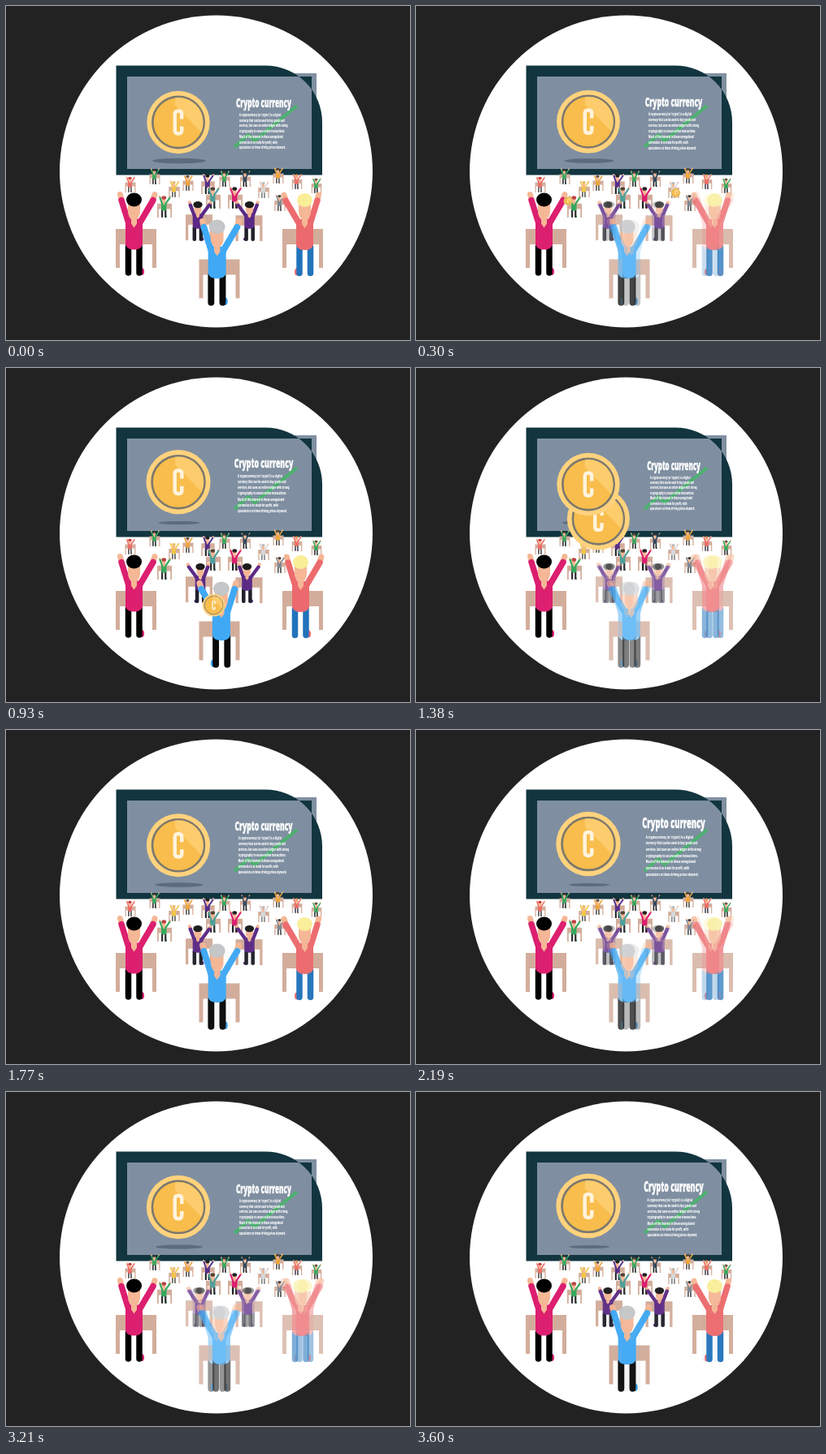
Recreate the animation shown at these times as an HTML page. Size 497 by 412 pixels, loop 3.63 s.

```html
<!DOCTYPE html>
<html lang="en">
<head>
<meta charset="utf-8">
<title>Crypto currency</title>
<style>
html, body { margin: 0; width: 100%; height: 100%; overflow: hidden; background: #222; }
svg { display: block; width: 497px; height: 412px; }
text { font-family: "Open Sans", "Noto Sans", sans-serif; font-stretch: condensed; font-weight: 800; }
</style>
</head>
<body>
<svg id="stage" viewBox="0 0 497 412">
  <defs>
    <clipPath id="face"><circle r="30.5"/></clipPath>
    <g id="coin">
      <circle r="38.5" fill="#ffd27d"/>
      <circle r="31.5" fill="#f8bd4c" stroke="#7c786e" stroke-width="2.6"/>
      <path d="M-4-32V-21L29 13L40 0V-32Z" fill="#ffd277" opacity=".75" clip-path="url(#face)"/>
      <path d="M4.200-4V-10Q4.200-14 0-14T-4.200-10V10Q-4.200 14 0 14T4.200 10V5" fill="none" stroke="#fff3dc" stroke-width="4.400"/>
    </g>
  </defs>
  <circle cx="258.5" cy="204" r="192.5" fill="#fff"/>
  <path d="M145 83H382V205H145Z" fill="#7f8fa1"/>
  <path fill-rule="evenodd" fill="#12353f" d="M135.500 73.500H319A70 70 0 0 1 389 143.500V208.500H135.500ZM149 87H376V201H149Z"/>
  <path d="M281 174L298 159L306 166L358 123" fill="none" stroke="#43b867" stroke-width="4" opacity=".85"/>
  <g id="copy" fill="#fff"></g>
  <ellipse id="shadow" cx="213" cy="191" fill="#5d6b7c"/>
  <g id="crowd"></g>
  <g id="coins"></g>
  <use id="main" href="#coin"/>
</svg>
<script>
const LOOP = 3630;
const $ = id => document.getElementById(id);
const SKIN = '#f5b795', TAN = '#d3ad9b';

const table = (x, bottom, s) =>
  `<path transform="translate(${x} ${bottom}) scale(${s})" fill="${TAN}"
    d="M-25-48H25V0H20V-29H-20V0H-25Z"/>`;

// Feet rest on y = 0; the pose leans left of its axis unless shifted.
const person = (x, foot, sx, sy, [top, hair, legs], shift = 0) =>
  `<g transform="translate(${x} ${foot}) scale(${sx} ${sy}) translate(${shift} 0)" stroke-linecap="round">
    <ellipse cx="5" cy="-5" rx="3" ry="4.500" fill="${top}"/>
    <path d="M-11.500-36V-3.500M2-36V-3.500" stroke="${legs}" stroke-width="7.500"/>
    <path d="M-20-94L-21.500-100M19-94L21-100" stroke="${SKIN}" stroke-width="7"/>
    <path d="M-15-66Q-15-70-11-70H2Q6-70 6-66V-38Q4-32-4.500-32T-15-38Z" fill="${top}"/>
    <path d="M-11-64L-20-93M2-64L19-93" stroke="${top}" stroke-width="7.500"/>
    <path d="M-12-90H3V-78Q2-72-1-70V-64L-4.500-59L-8-64V-70Q-11-72-12-78Z" fill="${SKIN}"/>
    <ellipse cx="-4.500" cy="-93.500" rx="9.500" ry="8.500" fill="${hair}"/>
  </g>`;

// x, foot, table scale, shirt, hair, trousers
const back = [
  [153, 230, .26, '#ed6b66', '#c33', '#555'], [183, 220, .26, '#35a85c', '#333', '#333'],
  [224, 228, .26, '#eda63a', '#654', '#555'], [269, 223, .26, '#35a85c', '#543', '#333'],
  [294.5, 223, .26, '#34495e', '#333', '#222'], [335, 219, .26, '#eda63a', '#543', '#555'],
  [358, 226, .25, '#ed6b66', '#e8955c', '#445'], [382, 231, .25, '#35a85c', '#654', '#333'],
  [207, 236, .27, '#f2c744', '#e8c060', '#666'], [248.5, 232, .33, '#54308c', '#222', '#222'],
  [317, 237, .27, '#d5dade', '#bbb', '#888'], [337, 253, .27, '#7d8894', '#444', '#555'],
  [195, 261, .36, '#35a85c', '#b44', '#333'], [255, 250, .36, '#4f9f9a', '#543', '#333'],
  [282, 250, .36, '#dc1f6f', '#222', '#222']
];

// axis, foot, table x, table bottom, table scale, person scale x / y, colours
const swaying = [
  [237.5, 290, 237.5, 289, .66, .6, .48, ['#5b2a86', '#1b1b1b', '#20202a']],
  [298, 290, 299, 290, .66, -.6, .48, ['#5b2a86', '#1b1b1b', '#20202a']],
  [365, 333, 365, 323, 1, -1, 1, ['#ec6a6d', '#f9ee98', '#2273bb']],
  [262.3, 369.5, 262.5, 360.5, 1, 1.05, 1.04, ['#3fa9f5', '#c4c6c8', '#0a0a0a']]
];

const pose = flip => swaying.map(([x, foot, tx, tb, ts, sx, sy, look]) =>
  `<g class="${flip < 0 ? 'right' : 'left'}">${table(tx, tb, ts)}${person(x, foot, sx * flip, sy, look, 2)}</g>`);
const lefts = pose(1), rights = pose(-1);

$('crowd').innerHTML =
  back.map(([x, y, s, ...look]) => table(x, y, s) + person(x, y, s * .85, s * .73, look, 2)).join('') +
  table(160, 323, 1) + person(162, 332.5, 1, 1, ['#dc1f6f', '#000', '#000']) +
  lefts.map((p, i) => p + rights[i]).join('');

const lines = [
  'A cryptocurrency (or ‘crypto’) is a digital',
  'currency that can be used to buy goods and',
  'services, but uses an online ledger with strong',
  'cryptography to secure online transactions.',
  'Much of the interest in these unregulated',
  'currencies is to trade for profit, with',
  'speculators at times driving prices skyward.'
];
$('copy').innerHTML =
  '<text transform="translate(317 125) scale(.53 1)" font-size="15.5" text-anchor="middle" stroke="#fff" stroke-width=".4">Crypto currency</text>' +
  lines.map((s, i) =>
    `<text transform="translate(287 ${136 + i * 6.7}) scale(.48 1)" font-size="5.2">${s}</text>`).join('');

// start, end, from x, from y, first scale, full-size time
const flights = [
  [270, 920, 187, 241, .09, 700],
  [270, 920, 320, 231, .1, 700],
  [800, 1690, 258, 301, .1, 1320]
];
$('coins').innerHTML = flights.map(() => '<use href="#coin"/>').join('');
const flying = [...$('coins').children];
const leaning = [...document.querySelectorAll('.left')];
const mirrored = [...document.querySelectorAll('.right')];

const clamp = v => Math.max(0, Math.min(1, v));
const ease = v => (1 - Math.cos(Math.PI * clamp(v))) / 2;
const mix = (a, b, v) => a + (b - a) * v;

const zoomKeys = [[0, 1], [300, 1.035], [620, 1.11], [930, 1.065], [1400, .965],
  [2190, 1.14], [2790, 1], [3000, .97], [3630, 1.08]];
const zoomAt = t => {
  const i = Math.max(1, zoomKeys.findIndex(k => k[0] > t));
  const [t0, a] = zoomKeys[i - 1], [t1, b] = zoomKeys[i];
  return mix(a, b, ease((t - t0) / (t1 - t0)));
};
const hover = t => {
  const p = t % 1395;
  return p < 840 ? ease(p / 840) : 1 - ease((p - 840) / 555);
};

function draw(t) {
  const up = hover(t), x = 212, y = mix(143.5, 140.5, up);
  $('main').setAttribute('transform', `translate(${x} ${y}) scale(${mix(1.005, 1.03, up)})`);
  $('shadow').setAttribute('rx', mix(33, 25, up));
  $('shadow').setAttribute('ry', mix(3.2, 2, up));
  $('copy').setAttribute('transform', `translate(317 152) scale(${zoomAt(t)}) translate(-317 -152)`);

  const sway = (1 - Math.cos(2 * Math.PI * t / 1860)) / 2;
  leaning.forEach(g => g.style.opacity = 1 - sway);
  mirrored.forEach(g => g.style.opacity = sway);

  flights.forEach(([start, end, fx, fy, s0, full], i) => {
    const on = t >= start && t < end, p = ease((t - start) / (end - start));
    const s = mix(s0, 1, ease((t - start) / (full - start)) ** .65);
    flying[i].style.display = on ? '' : 'none';
    flying[i].setAttribute('transform', `translate(${mix(fx, x, p)} ${mix(fy, y, p)}) scale(${s})`);
  });
}

const begin = performance.now();
function tick() {
  draw((performance.now() - begin) % LOOP);
  requestAnimationFrame(tick);
}
tick();
</script>
</body>
</html>
```
